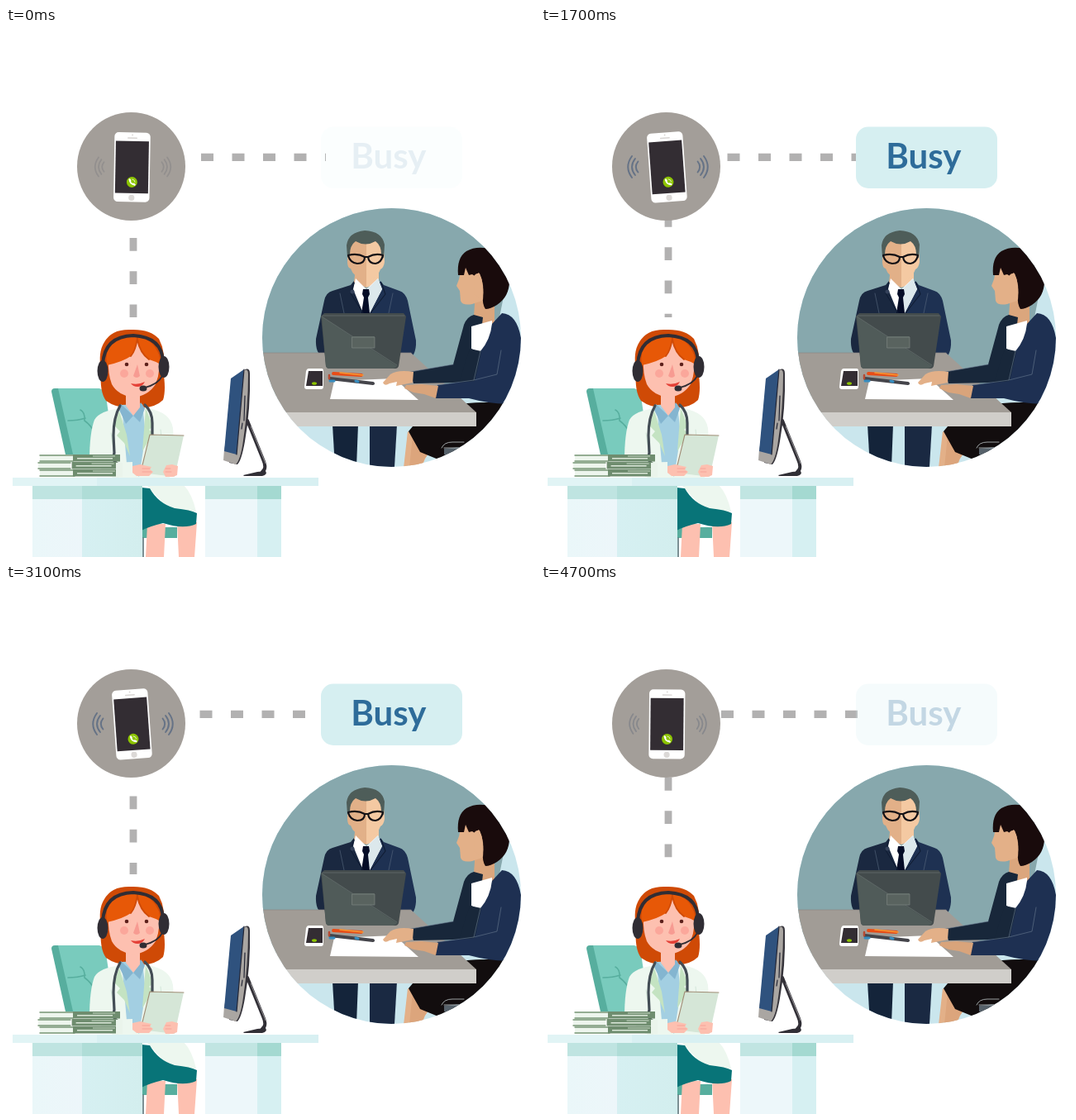
These frames come from a looping animation (640 by 640 pixels, 4800 ms). An HTML page with a canvas:

```html
<!DOCTYPE html>
<html lang="en">
<head>
<meta charset="utf-8">
<title>Busy line</title>
<style>
html, body { margin: 0; width: 100%; height: 100%; overflow: hidden; background: #fff; }
canvas { display: block; width: 640px; height: 640px; }
</style>
</head>
<body>
<canvas id="stage" width="640" height="640"></canvas>
<script>
const LOOP = 4800, STEP = 100;
const SKIN = '#fdc0b0';
const stage = document.getElementById('stage').getContext('2d');
const sceneCanvas = document.createElement('canvas');
sceneCanvas.width = sceneCanvas.height = 640;
let g = sceneCanvas.getContext('2d');

const fill = (color, d) => { g.fillStyle = color; g.fill(new Path2D(d)); };
const line = (color, width, d) => {
  g.strokeStyle = color;
  g.lineWidth = width;
  g.lineCap = g.lineJoin = 'round';
  g.stroke(new Path2D(d));
};
const rect = (color, x, y, w, h, r = 0) => {
  g.fillStyle = color;
  g.beginPath();
  g.roundRect(x, y, w, h, r);
  g.fill();
};
const oval = (color, x, y, rx, ry = rx, turn = 0) => {
  g.fillStyle = color;
  g.beginPath();
  g.ellipse(x, y, rx, ry, turn, 0, Math.PI * 2);
  g.fill();
};
const fade = (x0, x1, a, b) => {
  const grad = g.createLinearGradient(x0, 0, x1, 0);
  grad.addColorStop(0, a);
  grad.addColorStop(1, b);
  return grad;
};

function drawMan() {
  fill('#14243a', 'M395 480H426L424 531H398Z');
  fill('#1a2942', 'M440 480H473L470 531H440Z');
  fill('#1a2840', 'M421 306L417 311L395 318Q387 320 385 330L375 376Q374 394 384 398L437 400V330Z');
  fill('#1e3152', 'M453 306L457 311L476 318Q483 320 486 330L496 378Q497 397 484 404L437 400V330Z');
  line('#5a6b80', .6, 'M404 321L409 345M468 321L463 345');
  fill('#e2b088', 'M423 290H436V314L421 308Z');
  fill('#f4c9a2', 'M436 290H451V308L436 314Z');
  fill('#fff', 'M423 303L436 316L450 303L455 316L440 345H432L420 316Z');
  fill('#dce8ec', 'M437 316L450 303L455 316L440 345Z');
  fill('#050d27', 'M432 316H439L440 322L438 326L440 345H430L433 326L431 322Z');
  line('#101d34', 1.2, 'M421 308L417 321L432 345M454 308L459 322L441 345');
  fill('#e2b088', 'M414 264Q413 275 413 283Q413 290 417 291Q420 301 436 307V255H420Z');
  fill('#f4c9a2', 'M436 255H453Q458 267 458 283Q457 290 453 292Q450 302 436 307Z');
  fill('#4e5d59', 'M413 278L412 263Q414 247 434 245Q455 246 458 262L457 279L454 274Q454 263 447 258Q435 265 423 258Q416 263 416 274Z');
  line('#121015', 2.1, 'M414 275Q425 272 434 277Q434 285 425 285Q416 284 414 275ZM456 275Q447 272 438 277Q439 285 447 285Q454 284 456 275ZM434 277H438');
  oval('#34415a', 419, 319, 2.5);
}

function drawTable() {
  fill('#a19c96', 'M300 393H490L569 465H300Z');
  rect('#d0ceca', 300, 465, 269, 17);
  line('#8a8681', .7, 'M311 393H490');
  fill('#434b4c', 'M381 349L385 345H481L484 349L475 409Q474 412 471 412H391Q388 412 387 409Z');
  fill('#505b59', 'M382 349L473 409Q471 412 468 412H391Q388 412 387 409Z');
  line('#677170', .7, 'M382 349L473 408M383 348H482');
  rect('#59635f', 418, 373, 28, 14, 1);
  line('#7c8582', .7, 'M419 374H446V387H419Z');
  fill('#fff', 'M366 412H382Q384 412 384 415V434Q384 437 381 437H364Q361 437 361 434L363 415Q364 412 366 412Z');
  fill('#332d33', 'M366 415H383V433H363Z');
  oval('#8cc400', 373, 430, 3, 1.8);
  fill('#fff', 'M397 427L470 424L499 450L392 449Z');
  line('#e84c16', 3.8, 'M396 418L430 420');
  line('#f59a36', 1.5, 'M404 417L432 420');
  line('#45454b', 4, 'M392 424L444 430');
  line('#378dc0', 3, 'M392 427L397 427M423 427L426 428');
  line('#b84a32', 2.5, 'M391 420V424');
}

// The desk hides the top of the skirt.
function drawLegs() {
  fill('#e3b088', 'M486 488L518 504L507 521L499 541H480Z');
  fill('#dca57c', 'M492 493L518 504L506 522L499 541H487Z');
  fill('#120d0e', 'M487 488L503 469Q540 452 583 453H625V531H545L501 513Z');
  fill('#56616a', 'M530 509L550 507V517L530 516Z');
  line('#d9e2e4', .7, 'M527 508Q530 501 540 501H554M530 508H551');
}

function drawWoman() {
  fill('#dba67d', 'M568 318L591 328V357L565 365Z');
  fill('#18273a', 'M566 347Q558 349 554 359L541 407L489 416L493 430L548 429L567 438L577 350Z');
  fill('#fff', 'M563 361L588 354Q589 374 574 393L563 388Z');
  fill('#1e3052', 'M588 358L600 345Q618 346 623 375L625 437L617 454Q594 457 560 448L519 448L522 432L566 426L574 391Q586 377 588 358Z');
  fill('#18273a', 'M561 388L575 391L567 427L548 429Z');
  line('#6b7d91', .6, 'M489 416L541 407M522 432L566 426L574 391M599 390L594 419L566 426');
  fill('#e3b088', 'M493 416Q474 413 465 419L456 429Q458 434 464 430L473 428L472 433L492 429Z');
  fill('#d9a47b', 'M523 433L503 431L484 432L482 436L493 441L506 443L520 448Z');
  fill('#e3b088', 'M551 290L548 304L545 312L549 318L550 330Q552 336 564 334L579 329L577 289Z');
  fill('#190b0c', 'M547 299Q545 278 557 270Q571 262 592 269Q606 278 609 306Q609 325 594 335Q586 340 580 340Q576 334 577 324Q578 306 572 296L567 300L564 298L560 299L556 290L554 299Z');
  fill('#e3b088', 'M566 300Q569 296 573 297Q579 310 577 329L567 323Z');
}

function drawMeeting() {
  g.save();
  g.beginPath();
  g.arc(466.5, 374.5, 156.5, 0, Math.PI * 2);
  g.clip();
  rect('#cae6ed', 300, 210, 330, 330);
  fill('#87a8ad', 'M300 210H630V300H607L597 350V445H300Z');
  drawMan();
  drawLegs();
  drawTable();
  drawWoman();
  g.restore();
}

function drawDoctor() {
  // chair
  fill('#57ae9e', 'M55 440Q55 436 59 436H68L86 516H72Z');
  fill('#79cbbd', 'M63 436H113Q120 438 121 446L132 520H82Z');
  line('#57ae9e', 1.6, 'M75 475Q87 475 96 472M90 462Q96 465 95 475Q102 480 108 490');
  fill('#57ae9e', 'M165 604H207V617H165Z');
  line('#516b70', 1.5, 'M166 617V640');

  // hair and neck
  fill('#cf4a06', 'M151 365Q128 364 119 380Q111 392 115 415Q113 440 121 451Q135 461 154 459Q178 462 190 450Q194 438 190 414Q194 393 185 376Q174 364 151 365Z');

  // coat
  fill('#edf7ef', 'M139 460Q113 463 107 474Q101 490 101 523L129 544H198Q205 521 202 484Q199 465 172 460Z');
  line('#cce2d3', .8, 'M127 490L135 543M187 486L188 495');
  fill('#a3cfe2', 'M140 456L165 455L169 492L161 543L146 527Z');
  fill('#84b5d0', 'M139 455L154 469L145 479L137 462ZM163 453L154 469L162 477L168 460Z');
  fill('#c4e3c2', 'M137 463L146 492L150 518L143 502L134 493L138 488L131 481ZM169 460L178 482L173 486L178 490L165 512Z');
  fill(SKIN, 'M145 442H162V459L154 469L145 457Z');
  line('#434d55', 3.2, 'M138 457Q130 471 130 493L131 514Q128 526 137 528M168 456Q177 464 177 478V496');

  // head
  fill(SKIN, 'M124 401Q124 388 141 377L151 375Q171 377 184 394Q188 414 181 431Q172 445 154 447Q135 444 128 431Q123 418 124 401Z');
  fill('#e75807', 'M122 408Q118 374 150 372Q184 373 187 407Q180 403 173 401Q162 393 159 377Q157 390 151 397Q141 404 122 408Z');
  line('#cf4a06', 1.8, 'M159 375Q157 390 151 397M159 377Q162 393 173 401');
  oval('#fba79b', 143, 418, 5);
  oval('#fba79b', 174, 418, 5);
  oval('#5d211c', 146, 407, 2.3);
  oval('#5d211c', 170, 407, 2.3);
  fill('#f79b92', 'M159 407L154 421Q158 425 162 421Z');
  fill('#e44037', 'M151 430Q160 432 168 428Q165 434 159 434Q154 434 151 430Z');
  line('#302d34', 4, 'M117 407Q119 373 154 372Q189 374 190 404');
  oval('#302d34', 117, 415, 6.5, 13);
  oval('#302d34', 191, 410, 6.5, 13);
  line('#302d34', 1.8, 'M189 421Q184 431 168 435');
  oval('#302d34', 166, 436, 4.5, 3.5);

  // clipboard and hands
  fill('#d5e6d7', 'M174 492L215 493L204 543L163 538Z');
  line('#a08d76', 1.1, 'M163 537L174 492L215 493');
  fill(SKIN, 'M153 530L162 528L176 531L174 534L178 537L173 542L158 542L153 538Z');
  fill(SKIN, 'M194 529L201 528L208 530L207 541L202 543H193L190 537Z');
  line('#f29a8e', .7, 'M165 533H174M165 537H176M193 533H199M193 537H200');
  fill('#edf7ef', 'M122 526L153 525V543H126Z');

  // lower body
  fill(SKIN, 'M171 600H193L191 640H169ZM207 598H231L228 640H209Z');
  fill('#edf7ef', 'M170 553H215Q225 563 230 585L200 585L180 564Z');
  fill('#087478', 'M164 556L174 557Q184 575 204 581Q224 583 231 587L230 600Q215 607 190 599Q173 603 164 608Z');
}

function drawBooks() {
  const rows = [[41, 40], [39, 39], [41, 42]];
  rows.forEach(([x, w], i) => {
    const y = 516 + i * 9;
    rect('#edf5ed', x, y, w, 9);
    line('#789777', 1.5, `M${x} ${y + 1}H${x + w}M${x} ${y + 8}H${x + w}`);
  });
  rows.forEach(([x], i) => {
    const y = 516 + i * 9, left = 81 + (x - 41) * .7;
    rect('#6f8d6f', left, y, 57 - i * 2, 8.5);
    rect('#dce8da', left + 5, y + 4, 43, 1.5);
    rect('#c8d9c6', left + 24, y + 1.5, 27, 1);
  });
  rect('#eaf4eb', 133, 526, 8, 17);
}

function drawDesk() {
  rect(fade(32, 92, '#eaf7f9', '#edf6fa'), 32, 570, 60, 70);
  rect(fade(92, 165, '#d6f0f2', '#d3eeee'), 92, 570, 73, 70);
  rect('#bfe4e1', 32, 554, 60, 16);
  rect('#afddd7', 92, 554, 73, 16);
  rect('#edf7fa', 241, 570, 63, 70);
  rect('#d6f0f2', 304, 570, 29, 70);
  rect('#c1e5e2', 241, 554, 63, 16);
  rect('#a4d9d1', 304, 554, 29, 16);
  rect('#d8f0f2', 8, 544, 370, 10);
  rect('#e1f4f5', 8, 544, 102, 10);
}

function drawMonitor() {
  line('#312f36', 4, 'M292 475L311 522Q316 533 310 537');
  fill('#312f36', 'M287 541L304 537L314 536Q317 540 310 542H288Z');
  line('#8c8a8d', 1, 'M296 482L314 527');
  fill('#36343b', 'M289 413Q295 411 295 418Q296 461 289 500Q285 523 280 528L270 526Z');
  fill('#aaa6a2', 'M288 414Q293 412 293 419Q293 460 287 499Q284 522 278 528L263 523L264 509Z');
  fill('#2f527e', 'M272 424L288 413L279 516L264 512Z');
  line('#242635', 1.2, 'M288 413L279 516M286 478L285 485M289 445L288 475');
}

function buildScene() {
  drawMeeting();
  drawDoctor();
  drawBooks();
  drawDesk();
  drawMonitor();
}

// Linear track of [time, value] pairs, repeated every span ms.
function track(keys, span, t) {
  const p = t % span;
  const i = keys.findIndex(k => k[0] > p);
  const [t0, a] = keys[i - 1], [t1, b] = keys[i];
  return a + (b - a) * (p - t0) / (t1 - t0);
}
const tilt = [[0, 1], [260, -3], [500, -4.2], [800, -4], [980, -3], [1040, .5], [1060, 2], [1220, 1]];
const glow = [[0, .1], [300, 1], [800, 1], [1100, .25], [1200, .1]];

function dashes(t) {
  const turn = t / 625;
  g.save();
  g.beginPath();
  g.rect(200, 140, 187, 30);
  g.rect(140, 220, 30, 130);
  g.clip();
  for (let i = 0; i < 7; i++) {
    rect('#b2b1b1', 161 + (turn % 1 + i) * 37.5, 151.8, 15, 9.3);
    rect('#b2b1b1', 149.6, 254 + (i - 2 - turn % 1) * 40.25, 8.8, 15.7);
  }
  g.restore();
}

function waves(t) {
  const s = (1 - Math.cos(t / 960 * Math.PI * 2)) / 2;
  const mix = (a, b) => Math.round(a + (b - a) * s);
  const color = `rgb(${mix(146, 43)},${mix(143, 77)},${mix(142, 124)})`;
  for (const side of [-1, 1]) {
    g.save();
    g.translate(153.5 + side * 26.5, 168);
    const k = .77 + .23 * s;
    g.scale(side * k, k);
    line(color, 2.2, 'M19.5 -15Q30.5 0 19.5 15M15 -11.5Q24 0 15 11.5M11 -7.5Q17 0 11 7.5');
    g.restore();
  }
}

function phone(t) {
  g.save();
  g.translate(152.4, 168.4);
  g.rotate(track(tilt, 1220, t) * Math.PI / 180);
  rect('#fff', -21.7, -42, 43.4, 84, 5);
  rect('#332d33', -20, -31.5, 40, 63);
  rect('#d8d5d3', -6, -36, 12, 1.4, .7);
  oval('#d8d5d3', 0, -39, .9);
  oval('#dcd9d7', 0, 37, 3.6);
  oval('#8cc400', .3, 18, 6.5);
  line('#fff', 1.7, 'M-2.5 15.5Q-2 20 3 21');
  line('#fff', 2.3, 'M-2.5 15L-1.8 16.5M2 20.3L3.5 21');
  line('#fff', .7, 'M.5 14.5Q4 15 4 18');
  g.restore();
}

function badge(t) {
  g.save();
  g.globalAlpha = track(glow, 1200, t);
  rect('#d6eff1', 381, 119.5, 171, 74.5, 15);
  g.fillStyle = '#2e6c9a';
  g.font = '700 42px Lato, sans-serif';
  g.fillText('Busy', 417.3, 169.5);
  g.restore();
}

function draw(t) {
  rect('#fff', 0, 0, 640, 640);
  dashes(t);
  oval('#a39e99', 151.5, 167.5, 65.5);
  waves(t);
  phone(t);
  badge(t);
  g.drawImage(sceneCanvas, 0, 0);
}

buildScene();
g = stage;
const start = performance.now();
function tick() {
  const t = (performance.now() - start) % LOOP;
  draw(Math.floor(t / STEP) * STEP);
  requestAnimationFrame(tick);
}
tick();
</script>
</body>
</html>
```
